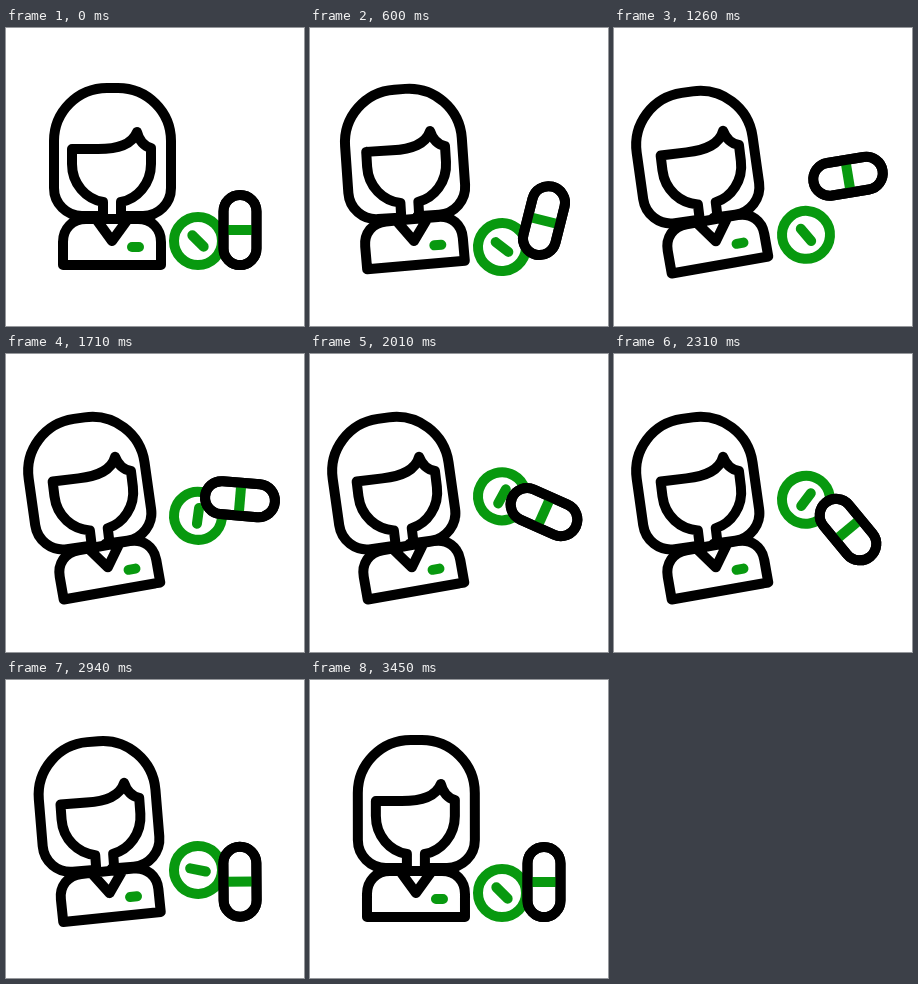
Write an HTML page that moves like this. It is 298 px wide and 298 px high and loops after 3.6 s.

```html
<!DOCTYPE html>
<html lang="en">
<head>
<meta charset="utf-8">
<title>Pharmacist</title>
<style>
  html, body { margin: 0; height: 100%; overflow: hidden; background: #fff; }
  svg { display: block; width: 100%; height: 100%; }
  g { fill: none; stroke: #000; stroke-width: 10; stroke-linecap: round; stroke-linejoin: round; }
  .green { stroke: #08990f; }
</style>
</head>
<body>
<svg viewBox="0 0 298 298">
  <g id="person">
    <path id="hair" d="M97 188H76A28 28 0 0 1 48 160V113A53 53 0 0 1 101 60H112A53 53 0 0 1 165 113V160A28 28 0 0 1 137 188H115"/>
    <path id="face" d="M66 121H92C112 121 126 117 131 104C133 112 138 118 145 120V136C145 156 131 171 115 174V189M66 121V136C66 156 80 171 97 174V189"/>
    <path d="M90 191H80C66 191 57 201 57 214V237H155V214C155 201 146 191 132 191H90L106 213L122 191"/>
    <path class="green" d="M126 219H133"/>
  </g>
  <!-- tablet and pill are drawn around their own centres -->
  <g id="tablet" class="green">
    <circle r="24"/>
    <path d="M-8 0H8"/>
  </g>
  <g id="pill">
    <rect x="-16.5" y="-35" width="33" height="70" rx="16.5" fill="#fff"/>
    <path class="green" stroke-linecap="butt" d="M-16 0H16"/>
    <rect x="-16.5" y="-35" width="33" height="70" rx="16.5"/>
  </g>
</svg>
<script>
  const LOOP = 3600, STEP = 30;
  const part = id => document.getElementById(id);
  const person = part('person'), hair = part('hair'), face = part('face');
  const tablet = part('tablet'), pill = part('pill');

  // Each track is a list of [time, value]; every segment eases in and out.
  const tracks = {
    lean: [[300, 0], [900, 1], [2500, 1], [3500, 0]],
    tabletY: [[300, 213], [900, 225], [2100, 141], [3450, 213]],
    tabletTurn: [[300, 45], [900, 30], [2100, 120], [3450, 225]],
    pillY: [[300, 202], [1500, 142], [3000, 202]],
    pillTurn: [[300, 0], [1500, 90], [3000, 180]]
  };

  function at(track, time) {
    const next = track.findIndex(key => key[0] > time);
    if (next === 0) return track[0][1];
    if (next < 0) return track[track.length - 1][1];
    const [t0, v0] = track[next - 1], [t1, v1] = track[next];
    const u = (time - t0) / (t1 - t0);
    return v0 + (v1 - v0) * u * u * (3 - 2 * u);
  }

  function place(el, x, y, turn, pivot = '0 0') {
    el.setAttribute('transform', `translate(${x} ${y}) rotate(${turn} ${pivot})`);
  }

  function draw(now) {
    const time = Math.floor(now % LOOP / STEP) * STEP;
    const get = name => at(tracks[name], time);
    const lean = get('lean');
    // The head tilts a little less than the body.
    place(person, 0, 0, -10 * lean, '106 237');
    place(hair, -5 * lean, lean, 2 * lean, '106 125');
    place(face, -0.5 * lean, 0, 3 * lean, '106 140');
    place(tablet, 192, get('tabletY'), get('tabletTurn'));
    place(pill, 234, get('pillY'), get('pillTurn'));
  }

  const start = performance.now();
  function tick() {
    draw(performance.now() - start);
    requestAnimationFrame(tick);
  }
  tick();
</script>
</body>
</html>
```
